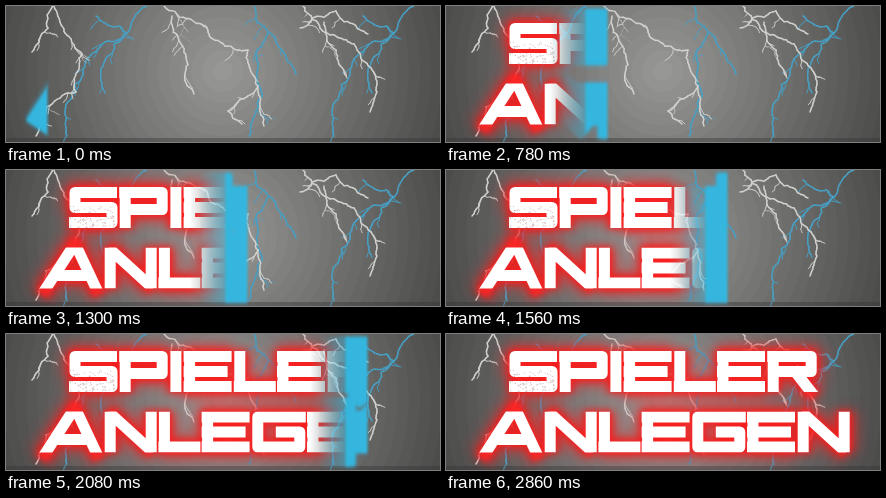
These frames come from a looping animation (434x136 px, 3.38 s). An HTML page with a canvas:

```html
<!DOCTYPE html>
<html lang="de">
<head>
<meta charset="utf-8">
<title>Spieler anlegen</title>
<style>
  html, body { margin: 0; width: 100%; height: 100%; overflow: hidden; background: #555; }
  canvas { display: block; }
</style>
</head>
<body>
<canvas id="stage" width="434" height="136" role="img" aria-label="SPIELER ANLEGEN"></canvas>
<script>
const W = 434, H = 136;
const STEP = 130, LOOP = 3380, LAST = 22;
const BAR = 11, CAP = 41, GAP = 1.2, ROWS = [17, 77.5];
const CYAN = '#35b6df';
const stage = document.getElementById('stage').getContext('2d');

function layer(draw) {
  const canvas = document.createElement('canvas');
  canvas.width = W;
  canvas.height = H;
  draw(canvas.getContext('2d'));
  return canvas;
}

function seeded(seed) {
  return () => (seed = (seed * 16807) % 2147483647) / 2147483647;
}

// Wide display letters: advance width and centre lines of the bars
const glyphs = {
  S: [49, 'M48 5.5H6V20.5H43V35.5H0'],
  P: [49, 'M6 0V41M0 5.5H43V22.5H6'],
  I: [13, 'M6.5 0V41'],
  E: [49, 'M6 0V41M0 5.5H48M0 20.5H44M0 35.5H48'],
  L: [42, 'M6 0V41M0 35.5H42'],
  R: [51, 'M6 0V41M0 5.5H44V20.5H6M26 18L47 45'],
  A: [64, 'M3 47L36 -4L60 47M18 28H50'],
  N: [53, 'M6 41V0M4 0L49 41M47 41V0'],
  G: [54, 'M54 5.5H6V35.5H48V20.5H24']
};

const lettering = new Path2D();
function addWord(word, x, y) {
  for (const char of word) {
    const [width, path] = glyphs[char];
    lettering.addPath(new Path2D(path), new DOMMatrix([1, 0, 0, 1, x, y]));
    x += width + GAP;
  }
}
addWord('SPIELER', 63, ROWS[0]);
addWord('ANLEGEN', 33, ROWS[1]);

// Jagged line through key points, with small random forks
function bolt(c, color, points, dx = 0) {
  const random = seeded(points[0] * 31 + points[2] * 7 + points[3]);
  const jitter = size => (random() - .5) * size;

  function crack(x0, y0, x1, y1, width) {
    const length = Math.hypot(x1 - x0, y1 - y0);
    if (length > 4) {
      const x = (x0 + x1) / 2 + jitter(length * .3);
      const y = (y0 + y1) / 2 + jitter(length * .3);
      crack(x0, y0, x, y, width);
      crack(x, y, x1, y1, width);
      if (length > 9 && random() < .3) {
        crack(x, y, x + jitter(26), y + random() * 14, width * .6);
      }
      return;
    }
    c.lineWidth = width;
    c.beginPath();
    c.moveTo(x0 + dx, y0);
    c.lineTo(x1 + dx, y1);
    c.stroke();
  }

  c.strokeStyle = color;
  c.lineCap = 'round';
  for (let i = 2; i < points.length; i += 2) crack(...points.slice(i - 2, i + 2), 1.5);
}

const background = layer(c => {
  c.fillStyle = '#4b4b49';
  c.fillRect(0, 0, W, H);
  for (let r = 230; r > 0; r -= 11) {
    const shade = Math.round(154 - r * .34);
    c.fillStyle = `rgb(${shade},${shade},${shade - 1})`;
    c.beginPath();
    c.arc(217, 65, r, 0, 7);
    c.fill();
  }
  c.fillStyle = 'rgba(50,50,50,.4)';
  c.fillRect(0, 132, W, 4);

  const blue = '#489fc2', white = '#cfcfcc';
  for (const dx of [-267, 0]) {
    bolt(c, blue, [408, 0, 388, 27, 346, 58, 333, 90, 328, 130], dx);
    bolt(c, blue, [357, 10, 388, 27, 364, 60, 366, 87], dx);
  }
  bolt(c, blue, [248, 0, 262, 26, 280, 50, 290, 68]);
  bolt(c, blue, [262, 26, 256, 90, 243, 130]);

  bolt(c, white, [47, 0, 42, 22, 26, 46]);
  bolt(c, white, [48, 0, 76, 48, 70, 86, 40, 101, 30, 130]);
  bolt(c, white, [158, 0, 205, 32, 242, 44, 252, 80, 258, 120]);
  bolt(c, white, [166, 10, 180, 50, 188, 88]);
  bolt(c, white, [252, 80, 222, 105, 236, 118]);
  bolt(c, white, [297, 0, 314, 22, 348, 38, 371, 78, 364, 106]);
  bolt(c, white, [294, 22, 330, 5, 362, 28]);
  bolt(c, white, [318, 16, 330, 44, 340, 70]);
});

const letters = layer(c => {
  for (const y of ROWS) c.rect(0, y, W, CAP);
  c.clip();
  c.strokeStyle = '#fff';
  c.lineWidth = BAR;
  c.lineJoin = 'round';
  c.stroke(lettering);

  // Worn speckles on the lower half of the first letter
  const random = seeded(42);
  c.globalCompositeOperation = 'source-atop';
  c.fillStyle = 'rgba(190,150,150,.6)';
  for (let i = 0; i < 130; i++) {
    c.fillRect(63 + random() * 45, 58 - random() * 22, 1, 1);
  }
});

// Blurred outline only: the stroke itself lies off the canvas
function glow(c, color, spread, blur) {
  c.save();
  c.translate(-2 * W, 0);
  c.shadowOffsetX = 2 * W;
  c.shadowColor = color;
  c.shadowBlur = blur;
  c.lineWidth = BAR + spread;
  c.lineJoin = 'round';
  c.stroke(lettering);
  c.restore();
}

const title = layer(c => {
  glow(c, 'rgba(235,50,50,.5)', 16, 14);
  glow(c, 'rgba(250,20,20,.85)', 5, 9);
  glow(c, 'rgba(255,40,40,.7)', 1, 4);
  c.drawImage(letters, 0, 0);
});

const halo = layer(c => {
  glow(c, CYAN, 28, 5);
  glow(c, CYAN, 26, 3);
});

const scratch = layer(() => {});
const brush = scratch.getContext('2d');

// Draws a layer through a horizontal alpha ramp of [x, alpha] stops
function drawMasked(source, stops) {
  const from = stops[0][0], to = stops[stops.length - 1][0];
  const ramp = brush.createLinearGradient(from, 0, to, 0);
  for (const [x, alpha] of stops) {
    ramp.addColorStop((x - from) / (to - from), `rgba(0,0,0,${alpha})`);
  }
  brush.globalCompositeOperation = 'copy';
  brush.drawImage(source, 0, 0);
  brush.globalCompositeOperation = 'destination-in';
  brush.fillStyle = ramp;
  brush.fillRect(0, 0, W, H);
  stage.drawImage(scratch, 0, 0);
}

function render(time) {
  const step = Math.min(LAST, Math.floor(time % LOOP / STEP));
  const right = 41.5 + 20 * step, left = right - 21;
  stage.drawImage(background, 0, 0);
  drawMasked(title, [[left - 37, 1], [left, 0]]);
  drawMasked(halo, [[left - 28, 0], [left - 3, .45], [left + 1, 1], [right - 2, 1], [right + 2, 0]]);
}

const start = performance.now();
function tick() {
  render(performance.now() - start);
  requestAnimationFrame(tick);
}
tick();
</script>
</body>
</html>
```
